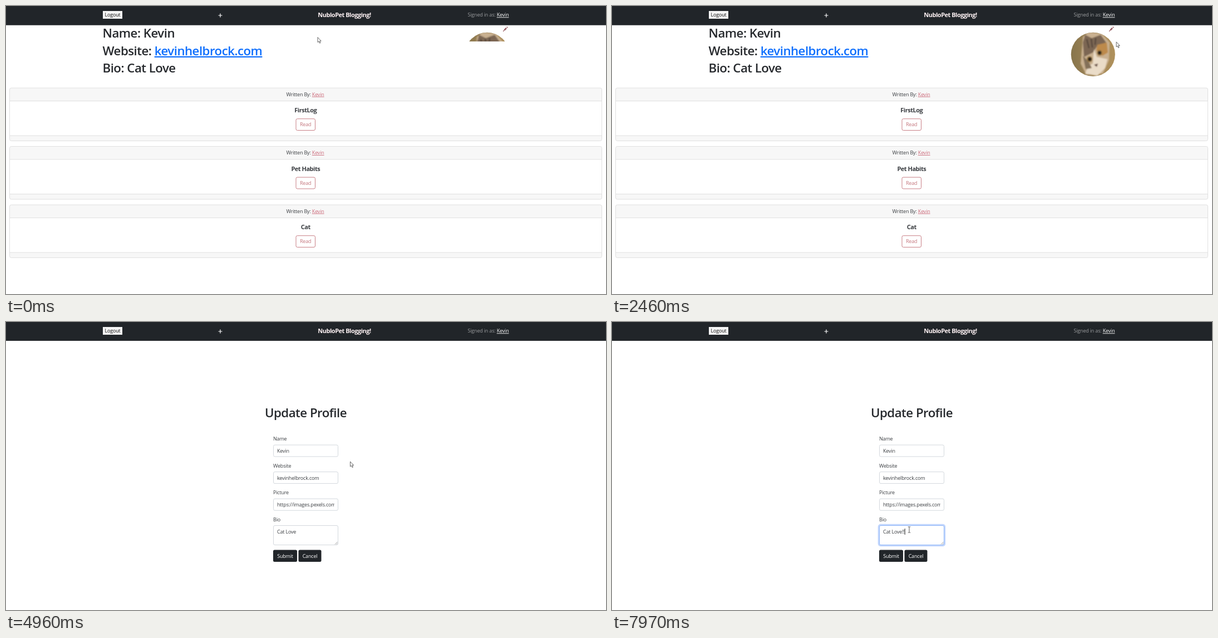
An HTML page that plays this animation: 1078 px wide and 520 px high, repeating every 8000 ms.

```html
<!DOCTYPE html>
<html lang="en">
<head>
<meta charset="utf-8">
<title>Blog profile</title>
<style>
  html, body { margin: 0; width: 100%; height: 100%; overflow: hidden; background: #fff; }
  svg { display: block; }
  text { font: 9px "Open Sans", "Noto Sans", sans-serif; letter-spacing: -.02em; fill: #3b3e42; white-space: pre; }
  .h1 { font-size: 22.3px; font-weight: 600; letter-spacing: -.024em; fill: #26292d; }
  .h5 { font-size: 11px; font-weight: 700; letter-spacing: -.045em; }
  .mid { text-anchor: middle; }
  .light { fill: #fff; }
  .link { text-decoration: underline; }
  .pink { fill: #cc6c7c; }
  .field { fill: #fff; stroke: #d3d8dd; }
  .dark { fill: #212529; }
  .read { fill: #f9b2b4; stroke: #c97f86; }
  .label { fill: #c4757c; }
</style>
</head>
<body>
<svg width="1078" height="520" viewBox="0 0 1078 520">
  <defs>
    <clipPath id="round"><circle cx="864.3" cy="87.3" r="39.6"/></clipPath>
    <clipPath id="loaded"><rect id="loadBox" x="820" y="40" width="90" height="90"/></clipPath>
    <clipPath id="fieldClip"><rect x="487" y="320" width="103" height="20"/></clipPath>
    <linearGradient id="wall">
      <stop offset="0" stop-color="#84734a"/><stop offset=".5" stop-color="#a08557"/><stop offset="1" stop-color="#b2935c"/>
    </linearGradient>
    <filter id="soft"><feGaussianBlur stdDeviation="1"/></filter>
  </defs>

  <g id="blog">
    <rect class="dark" width="1078" height="34.7"/>
    <text class="h1" x="173.5" y="57">Name: Kevin</text>
    <text class="h1" x="173.5" y="88.7">Website: <tspan id="site" class="link">kevinhelbrock.com</tspan></text>
    <text class="h1" x="173.5" y="120.4">Bio: Cat Love</text>

    <g clip-path="url(#loaded)"><g clip-path="url(#round)">
      <path d="M820 40H910V130H820Z" fill="url(#wall)"/>
      <g filter="url(#soft)">
        <path d="M846 56L856 47 880 50 894 66 893 98 882 122 852 124 842 104Z" fill="#c9b090"/>
        <path d="M846 66L850 52 862 58 878 52 888 66 872 72 864 84 848 92Z" fill="#7b6653"/>
        <path d="M872 70L889 66 891 84 881 90 870 80Z" fill="#bd8a4c"/>
        <path d="M853 60L857 76M861 59L863 75M869 58L868 70" stroke="#4f4138" stroke-width="2"/>
        <path d="M866 78L871 92 890 96 886 112 872 126 850 122 856 108 864 104Z" fill="#eadcc8"/>
        <path d="M846 90L856 100 862 112 851 114Z" fill="#836f59"/>
        <ellipse cx="858" cy="96" rx="5" ry="5.6" fill="#98773f"/>
        <ellipse cx="876" cy="84.5" rx="4.6" ry="5.2" fill="#98773f"/>
        <circle cx="858.4" cy="96" r="3.4" fill="#29231f"/>
        <circle cx="876" cy="84.5" r="3.2" fill="#29231f"/>
        <path d="M866 106L873 104 871 110Z" fill="#5d4038"/>
      </g>
    </g></g>

    <g id="pencil" stroke-width="2.6">
      <path d="M895.3 43.6L899 39.9M900 38.9L901 37.9"/>
      <path d="M893.2 45.8L895 44" stroke-width="1.3"/>
    </g>
    <g id="cards"></g>
  </g>

  <g id="form">
    <text class="h1 mid" x="538.5" y="172">Update Profile</text>
    <text x="480" y="214">Name</text>
    <text x="480" y="262.6">Website</text>
    <text x="480" y="311.2">Picture</text>
    <text x="480" y="359.6">Bio</text>
    <rect class="field" x="480.5" y="222" width="116" height="21" rx="2.5"/>
    <rect class="field" x="480.5" y="270.6" width="116" height="21" rx="2.5"/>
    <rect class="field" x="480.5" y="319.2" width="116" height="21" rx="2.5"/>
    <rect id="ring" x="479.2" y="366.2" width="118.6" height="37.6" rx="3.5" fill="none" stroke="#c3d7fd" stroke-width="3"/>
    <rect id="bioBox" class="field" x="480.5" y="367.5" width="116" height="35" rx="2.5"/>
    <path d="M591 401.5L595.5 397M593.7 401.5L595.5 399.7" stroke="#888" stroke-width=".8"/>
    <text x="487" y="236">Kevin</text>
    <text x="487" y="284.6">kevinhelbrock.com</text>
    <text x="487" y="333.2" clip-path="url(#fieldClip)">https://images.pexels.com</text>
    <text id="bio" x="487" y="381.7"></text>
    <path id="caret" d="M0 373V384" stroke="#222"/>
    <rect class="dark" x="480" y="411.5" width="43" height="21.5" rx="2.5"/>
    <rect class="dark" x="525.5" y="411.5" width="41" height="21.5" rx="2.5"/>
    <text class="mid light" x="501.5" y="425.5">Submit</text>
    <text class="mid light" x="546" y="425.5">Cancel</text>
  </g>

  <rect class="dark" width="1078" height="34"/>
  <rect x="174" y="9" width="35" height="14" fill="#f4f4f4"/>
  <text class="mid" x="191.5" y="19.2" style="fill:#111">Logout</text>
  <path d="M381.5 17H388.5M385 13.5V20.5" stroke="#fff" stroke-width="1.2"/>
  <text class="h5 mid" x="608" y="20" style="fill:#fdf1f3">NubloPet Blogging!</text>
  <text x="903.5" y="19.3" text-anchor="end" style="fill:#9b9d9f">Signed in as: <tspan class="light link">Kevin</tspan></text>

  <g id="cursor" stroke-linejoin="round">
    <path id="arrow" d="M0 0V9L2 7.3 3.5 10.6 5 10 3.5 6.7H6.2Z" fill="#fff" stroke="#555" stroke-width=".9"/>
    <path id="hand" d="M-1 1Q0-.6 1 1V5L5.2 6Q6.3 6.3 6.2 7.6L5.4 11V13H0V11.4L-3 8Q-3 6.6-1 8Z" fill="#fff" stroke="#444" stroke-width=".9"/>
    <path id="beam" d="M-2.2-5.2H-.7L0-4.6.7-5.2H2.2M0-4.6V4.6M-2.2 5.2H-.7L0 4.6.7 5.2H2.2" fill="none" stroke="#444" stroke-width=".9"/>
  </g>
</svg>
<script>
const LOOP = 8000, FORM_AT = 4220, FOCUS_AT = 6570, PITCH = 105.5;
const $ = id => document.getElementById(id);
const show = (id, on) => $(id).setAttribute('visibility', on ? 'inherit' : 'hidden');

$('cards').innerHTML = ['FirstLog', 'Pet Habits', 'Cat'].map((title, i) => `
  <g transform="translate(0 ${i * PITCH})">
    <rect x="6.5" y="148" width="1064" height="95.5" rx="3" fill="#f7f7f7" stroke="#e0e0e0"/>
    <path d="M7 171.5H1070V234H7Z" fill="#fff"/>
    <path d="M7 171.5H1070M7 234H1070" stroke="#e0e0e0"/>
    <text class="mid" x="537.5" y="162.6">Written By: <tspan class="pink link">Kevin</tspan></text>
    <text class="h5 mid" x="538.3" y="192">${title}</text>
    <rect class="read" x="521" y="203.7" width="34.5" height="20.8" rx="2.5"/>
    <text class="mid label" x="538.2" y="217.3">Read</text>
  </g>`).join('');
const reads = [...document.querySelectorAll('.read')];
const labels = [...document.querySelectorAll('.label')];

// Pointer stops: time, x, y
const stops = [
  [70, 560, 56.5], [680, 321, 70], [880, 317, 73], [1200, 300, 80], [1650, 540, 219],
  [1840, 541, 220], [1900, 541, 220], [2050, 541, 322], [2200, 541, 428], [2480, 911, 60],
  [3250, 898, 43], [4690, 898, 43], [4960, 618.5, 252], [5420, 538, 378.5],
  [7820, 538, 378.5], [7970, 534, 375]
];

// Hit areas: left, top, right, bottom
const readZones = [0, 1, 2].map(i => [520, 203 + i * PITCH, 556, 225 + i * PITCH]);
const siteZone = [267, 68, 460, 94], pencilZone = [892, 36, 904, 50];
const buttonZones = [[480, 411, 523, 433], [525, 411, 566, 433]];
const fieldZones = [[480, 222, 597, 243], [480, 270, 597, 292], [480, 319, 597, 340], [480, 367, 597, 403]];

function pointer(t) {
  const i = stops.findIndex(s => s[0] > t);
  if (i === 0) return stops[0].slice(1);
  if (i < 0) return stops.at(-1).slice(1);
  const [t0, x0, y0] = stops[i - 1], [t1, x1, y1] = stops[i];
  const u = (t - t0) / (t1 - t0), e = u * u * (3 - 2 * u);
  return [x0 + (x1 - x0) * e, y0 + (y1 - y0) * e];
}

function over([l, top, r, b], t) {
  const [x, y] = pointer(t);
  return x >= l && x <= r && y >= top && y <= b;
}

// Share of the last 150 ms spent inside a zone
function hover(zone, t) {
  let n = 0;
  for (let k = 0; k < 15; k++) n += over(zone, t - k * 10);
  return n / 15;
}

function drawBlog(t) {
  $('loadBox').setAttribute('height', t < 70 ? 24 : 90);
  $('site').style.fill = over(siteZone, t) ? '#0a5ad0' : '#0d6efd';
  $('pencil').setAttribute('stroke', over(pencilZone, t) ? '#d08a5c' : '#96585f');
  reads.forEach((rect, i) => {
    const h = hover(readZones[i], t);
    rect.style.fillOpacity = h;
    labels[i].style.opacity = 1 - .7 * h;
  });
}

function drawForm(t) {
  const focused = t >= FOCUS_AT;
  show('ring', focused);
  $('bioBox').style.stroke = focused ? '#8fb6f8' : '';
  $('bio').textContent = 'Cat Love' + '!'.repeat((t >= 7680) + (t >= 7820));
  show('caret', focused && (t < 6970 || t >= 7470));
  $('caret').setAttribute('transform', `translate(${487.5 + $('bio').getComputedTextLength()} 0)`);
}

function drawCursor(t, onForm) {
  const hit = zones => zones.some(z => over(z, t));
  const hand = hit(onForm ? buttonZones : [...readZones, siteZone, pencilZone]);
  const beam = onForm && hit(fieldZones);
  show('hand', hand);
  show('beam', beam);
  show('arrow', !hand && !beam);
  $('cursor').setAttribute('transform', `translate(${pointer(t)})`);
}

const start = performance.now();
function draw() {
  const t = (performance.now() - start) % LOOP, onForm = t >= FORM_AT;
  show('blog', !onForm);
  show('form', onForm);
  onForm ? drawForm(t) : drawBlog(t);
  drawCursor(t, onForm);
  requestAnimationFrame(draw);
}
draw();
</script>
</body>
</html>
```
